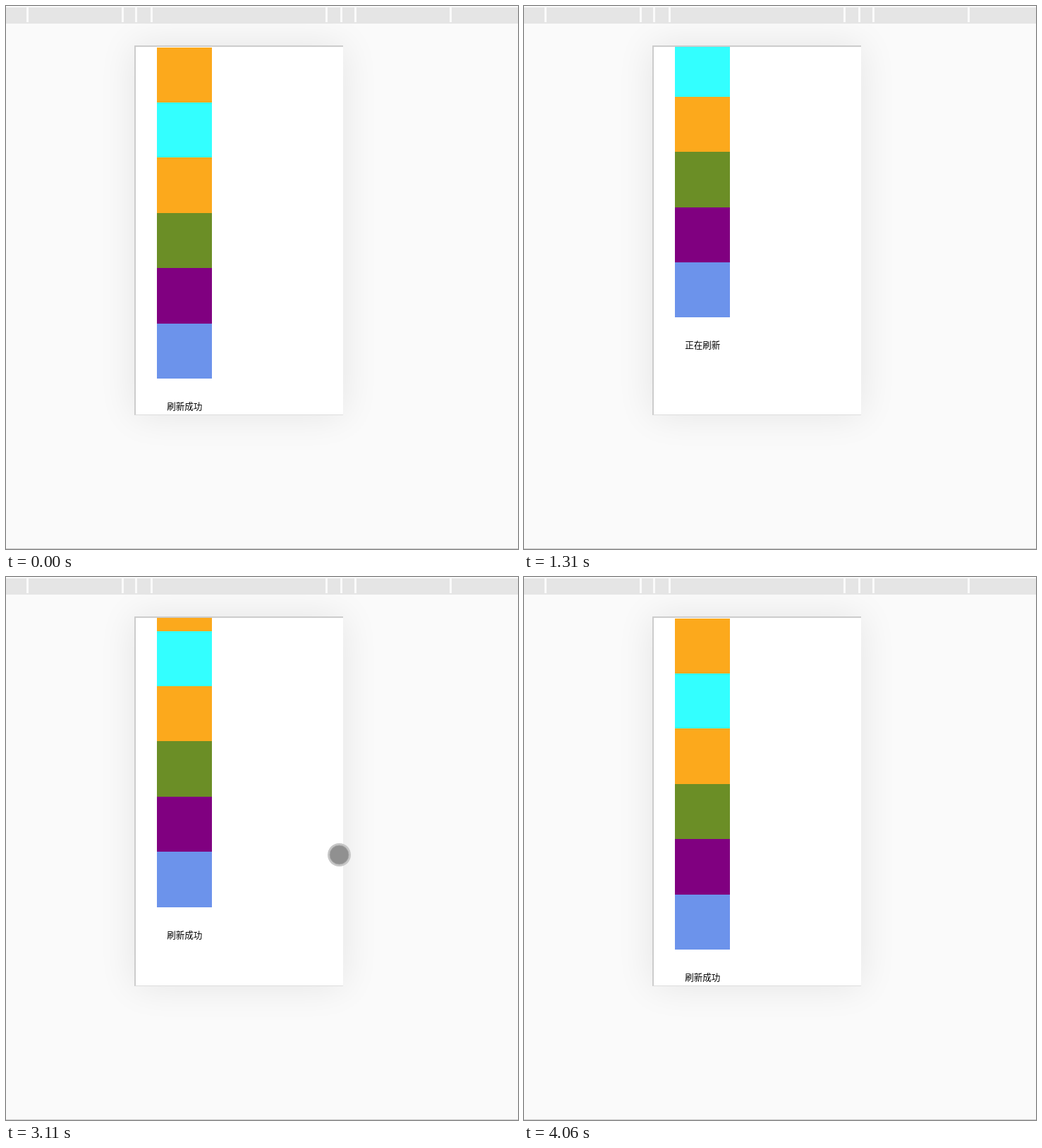
Animation, 726 px wide and 771 px high, one loop 4380 ms. Source, as an HTML page:

```html
<!DOCTYPE html>
<html lang="zh">
<head>
<meta charset="utf-8">
<title>Pull to load</title>
<style>
  html, body { margin: 0; width: 100%; height: 100%; overflow: hidden; background: #fafafa; }
  body { position: relative; }
  body, .phone { --cell: 78.4px; }

  .phone {
    position: absolute; left: 182px; top: 56px; width: 294px; height: 522px;
    border: solid #ccc; border-width: 2px 0 1px 2px; border-bottom-color: #ddd;
    background: #fff;
    box-shadow: 0 0 50px rgba(0, 0, 0, .09);
  }
  .view { position: absolute; inset: 0; overflow: hidden; }

  .bar { position: absolute; left: 0; top: 2px; width: 100%; height: 23px; background: #e5e5e5; }
  .bar i { position: absolute; top: 0; width: 3px; height: 21px; background: #fafafa; }
  .floor { position: absolute; left: 0; top: 770px; width: 100%; height: 1px; background: #ccc; }

  .list, .lines, .cursor, .touch { animation: 4380ms step-end infinite; }
  .list { position: absolute; left: 30px; top: .7px; width: var(--cell); animation-name: scroll; }
  .cell { height: var(--cell); }
  .label { position: relative; height: var(--cell); overflow: hidden; }
  .lines {
    position: absolute; left: 0; top: 0; width: 100%; animation-name: label;
    font: 12.54px/78.4px "Noto Sans CJK SC", "Noto Sans CJK", sans-serif;
    color: #000; text-align: center; white-space: nowrap;
  }

  .cursor, .touch { position: absolute; left: 0; top: 0; transform: translate(-99px, -99px); }
  .cursor { animation-name: cursor; }
  .touch { animation-name: touch; }

  @keyframes scroll {
    0% { top: .7px }
    11.87% { top: -.3px }
    13.69% { top: -4.3px }
    15.52% { top: -12.8px }
    17.35% { top: -31px }
    18.94% { top: -53px }
    20.77% { top: -73.6px }
    22.6% { top: -86px }
    69.17% { top: -81.5px }
    71% { top: -59.8px }
    72.83% { top: -36.5px }
    74.65% { top: -19.5px }
    76.25% { top: -9.8px }
    78.08% { top: -3.8px }
    79.9% { top: -.3px }
    81.73%, 100% { top: .7px }
  }
  @keyframes label {
    0% { top: 0 }
    11.87% { top: -78.4px }
    18.94% { top: -156.8px }
    22.6% { top: -235.2px }
    44.06%, 100% { top: 0 }
  }
  @keyframes cursor {
    0%, 2.96%, 42.23%, 54.79%, 92.69%, 100% { transform: translate(-99px, -99px) }
    1.59% { transform: translate(612px, 727px) }
    33.56% { transform: translate(523px, 255px) }
    45.89% { transform: translate(545px, 350px) }
    78.08% { transform: translate(481px, 404px) }
    81.73% { transform: translate(490px, 422px) }
    83.56% { transform: translate(520px, 482px) }
    85.38% { transform: translate(560px, 562px) }
    87.21% { transform: translate(598px, 642px) }
    89.04% { transform: translate(626px, 704px) }
    90.86% { transform: translate(642px, 750px) }
  }
  @keyframes touch {
    0%, 29.9%, 58.44%, 65.75%, 72.83%, 100% { transform: translate(-99px, -99px) }
    28.08% { transform: translate(234px, 122px) }
    56.62% { transform: translate(510px, 351px) }
    63.92% { transform: translate(455px, 372px) }
    71% { transform: translate(456px, 378px) }
  }
</style>
</head>
<body>
  <div class="phone">
    <div class="view">
      <div class="list">
        <div class="cell" style="background:#fca91c"></div>
        <div class="cell" style="background:#33ffff"></div>
        <div class="cell" style="background:#fca91c"></div>
        <div class="cell" style="background:#6b8e26"></div>
        <div class="cell" style="background:#800080"></div>
        <div class="cell" style="background:#6c93eb"></div>
        <div class="label">
          <div class="lines">
            <div>刷新成功</div>
            <div>上拉加载</div>
            <div>释放后刷新</div>
            <div>正在刷新</div>
          </div>
        </div>
      </div>
    </div>
  </div>

  <div class="bar">
    <i style="left:29px"></i><i style="left:164px"></i><i style="left:183px"></i><i style="left:205px"></i>
    <i style="left:453px"></i><i style="left:474px"></i><i style="left:494px"></i><i style="left:629px"></i>
  </div>
  <div class="floor"></div>

  <svg class="touch" width="33" height="33">
    <circle cx="16.5" cy="16.5" r="16.5" fill="#c6c6c6"/>
    <circle cx="16.5" cy="16.5" r="13.5" fill="#909090" stroke="#a6a6a6"/>
  </svg>
  <svg class="cursor" width="18" height="28">
    <path d="M.5 .5V24L6 19L9.3 26.5L13 25L9.8 17.7H17Z" fill="#fff" stroke="#000"/>
  </svg>
</body>
</html>
```
